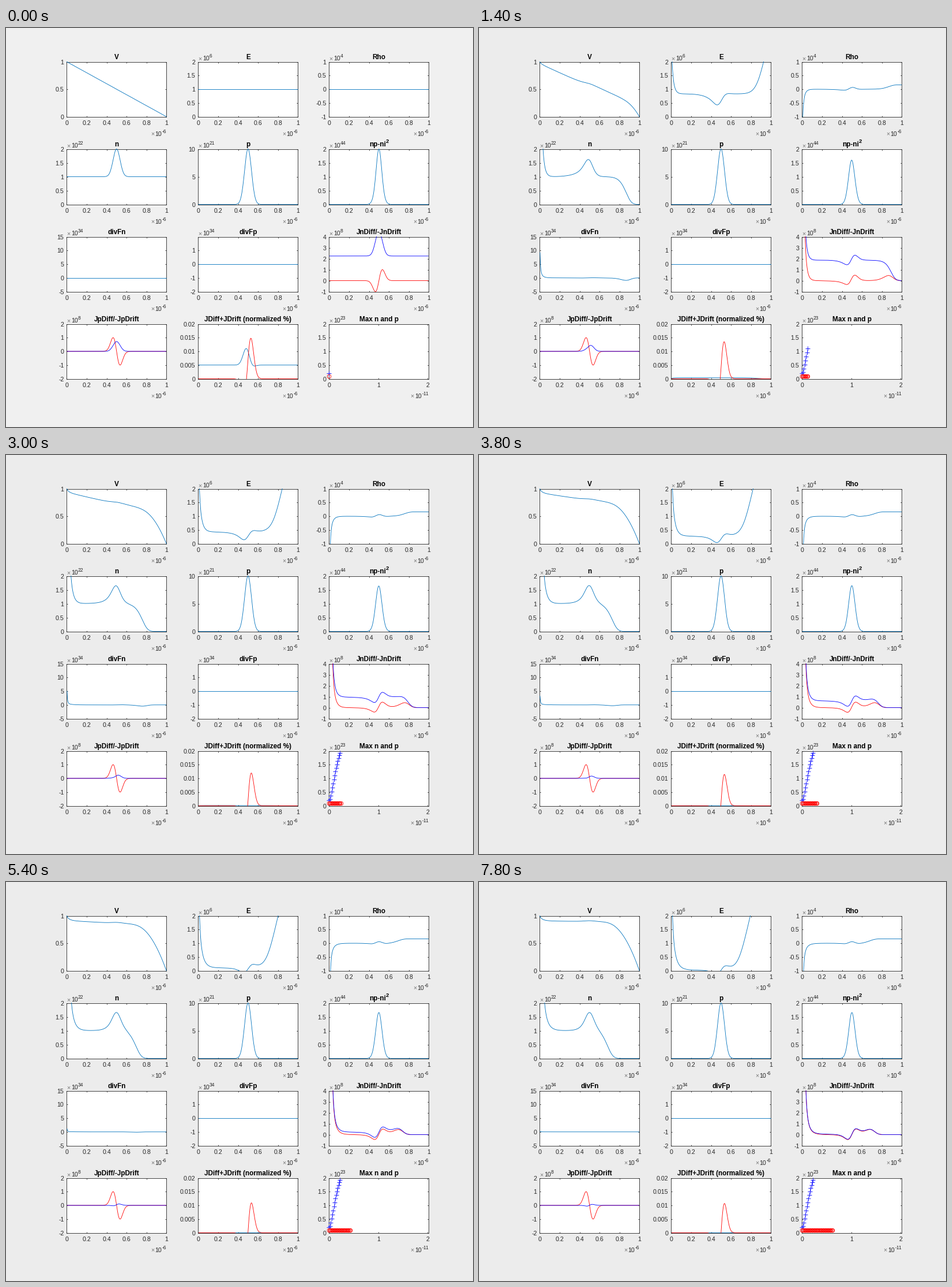
A matplotlib script that plays this animation: 810 px wide and 691 px high, repeating every 8 s.

```python
import numpy as np
import matplotlib
import matplotlib.pyplot as plt
from matplotlib.animation import FuncAnimation
from matplotlib.transforms import Bbox

matplotlib.rcParams["font.family"] = "Liberation Sans"

W, H, DPI = 810, 691, 64
PX = 72 / DPI                      # points per pixel
THIN = 0.85 * PX
FRAMES, STEP = 40, 200
BLUE, INK = (0, 0.447, 0.741), "#262626"

# --- drift-diffusion model: silicon bar, mobile electrons, fixed hole packet ---
Q, EPS, VT = 1.602e-19, 11.7 * 8.854e-12, 0.02585
MU_N, MU_P, DOPING, LENGTH = 0.14, 0.045, 1e22, 1e-6
DIFF = MU_N * VT
CELLS, SUB, DT = 220, 120, 1.58e-13
DX = LENGTH / CELLS

xf = np.linspace(0, 1, CELLS + 1)  # faces, in micrometres
xc = (xf[1:] + xf[:-1]) / 2        # cell centres
xi = xf[1:-1]                      # inner faces
p = 1e22 * np.exp(-((xc - 0.5) / 0.035) ** 2 / 2)


def middle(a):
    return (a[1:] + a[:-1]) / 2


def field(n):
    rho = Q * (DOPING + p - n)
    e = np.concatenate(([0], np.cumsum(rho) * DX / EPS))
    return rho, e + (1 - middle(e).sum() * DX) / LENGTH


def currents(n, e):
    return MU_N * middle(n) * e[1:-1], DIFF * np.diff(n) / DX


def growth(n):
    e = field(n)[1]
    drift, diff = currents(n, e)
    flux = np.concatenate(([0], drift + diff, [0]))
    return np.diff(flux) / DX


def share(drift, diff):
    return (drift - diff) / max(abs(drift).max(), abs(diff).max()) / 100


def snapshot(n, k):
    rho, e = field(n)
    drift, diff = currents(n, e)
    n_drift, n_diff = Q * drift, -Q * diff
    p_drift = Q * MU_P * middle(p) * e[1:-1]
    p_diff = Q * DIFF * np.diff(p) / DX
    v = 1 - np.concatenate(([0], np.cumsum(middle(e)) * DX))
    rate = growth(n) if k else np.zeros(CELLS)
    return [
        [(xf, v)],
        [(xf, e / 1e6)],
        [(xc, rho / 1e4)],
        [(xc, n / 1e22)],
        [(xc, p / 1e21)],
        [(xc, n * p / 1e44)],
        [(xc, rate / 1e34)],
        [(xc, 0 * xc)],
        [(xi, n_diff / 1e8), (xi, n_drift / 1e8)],
        [(xi, p_diff / 1e8), (xi, p_drift / 1e8)],
        [(xi, share(n_drift, n_diff)), (xi, share(p_drift, p_diff))],
    ]


def simulate():
    n = DOPING + p
    states, peaks = [], []
    for k in range(FRAMES):
        states.append(snapshot(n, k))
        peaks.append(n.max() / 1e23)
        for _ in range(SUB):
            n = n + growth(n) * DT / SUB
    return states, np.array(peaks)


states, n_peak = simulate()
times = np.arange(FRAMES) * DT / 1e-11
n_peak[n_peak > 2] = np.nan        # markers beyond the axis are hidden

# --- layout; edges sit just short of pixel centres so that frames snap there ---
LEFT, WIDTH = (105.45, 333.45, 560.45), 172.7
TOP, BOTTOM = (58.51, 209.51, 361.51, 512.51), (153.51, 305.51, 456.51, 607.51)

# title, exponent, y ticks, line colours, upper limit if it has no tick
PANELS = [
    ("V", "", "0 0.5 1", [BLUE]),
    ("E", "6", "0 0.5 1 1.5 2", [BLUE]),
    ("Rho", "4", "-1 -0.5 0 0.5 1", [BLUE]),
    ("n", "22", "0 0.5 1 1.5 2", [BLUE]),
    ("p", "21", "0 5 10", [BLUE]),
    ("np-ni", "44", "0 0.5 1 1.5 2", [BLUE]),
    ("divFn", "34", "-5 0 5 10 15", [BLUE]),
    ("divFp", "34", "-2 -1 0 1", [BLUE], 2),
    ("JnDiff/-JnDrift", "8", "-1 0 1 2 3 4", ["red", "blue"]),
    ("JpDiff/-JpDrift", "8", "-2 -1 0 1 2", ["red", "blue"]),
    ("JDiff+JDrift (normalized %)", "", "0 0.005 0.01 0.015 0.02", [BLUE, "red"]),
    ("Max n and p", "23", "0 0.5 1 1.5 2", []),
]

fig = plt.figure(figsize=(W / DPI, H / DPI), dpi=DPI)


def put(x, y, text, size=10.67, ha="left", color=INK, weight="normal"):
    fig.text(x / W, 1 - y / H, text, size=size * PX, ha=ha, va="baseline",
             color=color, weight=weight)


def power(x, y, exponent):
    put(x, y, "×", 10.67, color="#777777")
    put(x + 7.5, y, "10")
    put(x + 19.5, y - 5, exponent, 8.5)


def panel(i, title, exponent, yticks, colors, ymax=None):
    row, col = divmod(i, 3)
    left, top, bottom = LEFT[col], TOP[row], BOTTOM[row]
    ax = fig.add_axes([left / W, 1 - bottom / H, WIDTH / W, (bottom - top) / H])
    last = i == len(PANELS) - 1
    xticks = ("0 1 2" if last else "0 0.2 0.4 0.6 0.8 1").split()
    yticks = yticks.split()
    xs, ys = [float(t) for t in xticks], [float(t) for t in yticks]
    xmax = 2.02 if last else 1
    ymin, ymax = ys[0], ymax or ys[-1]
    ax.set(xlim=(0, xmax), xticks=xs, yticks=ys)
    ax.set_ylim(ymin, ymax)
    ax.tick_params(direction="in", length=2 * PX, width=THIN, color=INK, top=True,
                   right=True, labelbottom=False, labelleft=False)
    for spine in ax.spines.values():
        spine.set(linewidth=THIN, color=INK)

    for t, x in zip(xticks, xs):
        put(left + x / xmax * WIDTH, bottom + 14.5, t, ha="center")
    for t, y in zip(yticks, ys):
        put(left - 5, bottom - (y - ymin) / (ymax - ymin) * (bottom - top) + 4,
            t, ha="right")
    if exponent:
        power(left, top - 2.5, exponent)
    power(left + WIDTH - (31.5 if last else 27), bottom + 33,
          "-11" if last else "-6")
    mid = left + WIDTH / 2
    if title == "np-ni":
        put(mid - 17, top - 5, title, 11.73, color="black", weight="bold")
        put(mid + 11.5, top - 10.5, "2", 9.4, color="black", weight="bold")
    else:
        put(mid, top - 5, title, 11.73, "center", "black", "bold")

    lines = []
    box = Bbox.from_extents(left - 0.5, H - bottom - 0.5,
                            left + WIDTH + 0.5, H - top + 0.5)
    for color in colors:
        line, = ax.plot([], [], color=color, lw=THIN, zorder=3)
        line.set_clip_box(box)
        lines.append(line)
    return ax, lines


made = [panel(i, *spec) for i, spec in enumerate(PANELS)]
curves = [lines for _, lines in made[:-1]]
style = dict(ls="none", mew=THIN, clip_on=False, zorder=4)
plus, = made[-1][0].plot([], [], "b+", ms=7.5 * PX, **style)
ring, = made[-1][0].plot([], [], "ro", ms=6.5 * PX, mfc="none", **style)


def update(k):
    fig.set_facecolor("#f0f0f0" if k == 0 else "#ececec")
    for lines, data in zip(curves, states[k]):
        for line, (x, y) in zip(lines, data):
            line.set_data(x, y)
    plus.set_data(times[:k + 1], n_peak[:k + 1])
    ring.set_data(times[:k + 1], np.full(k + 1, 0.1))
    return []


anim = FuncAnimation(fig, update, frames=FRAMES, interval=STEP, repeat=True,
                     repeat_delay=0, blit=False)
plt.show()
```
